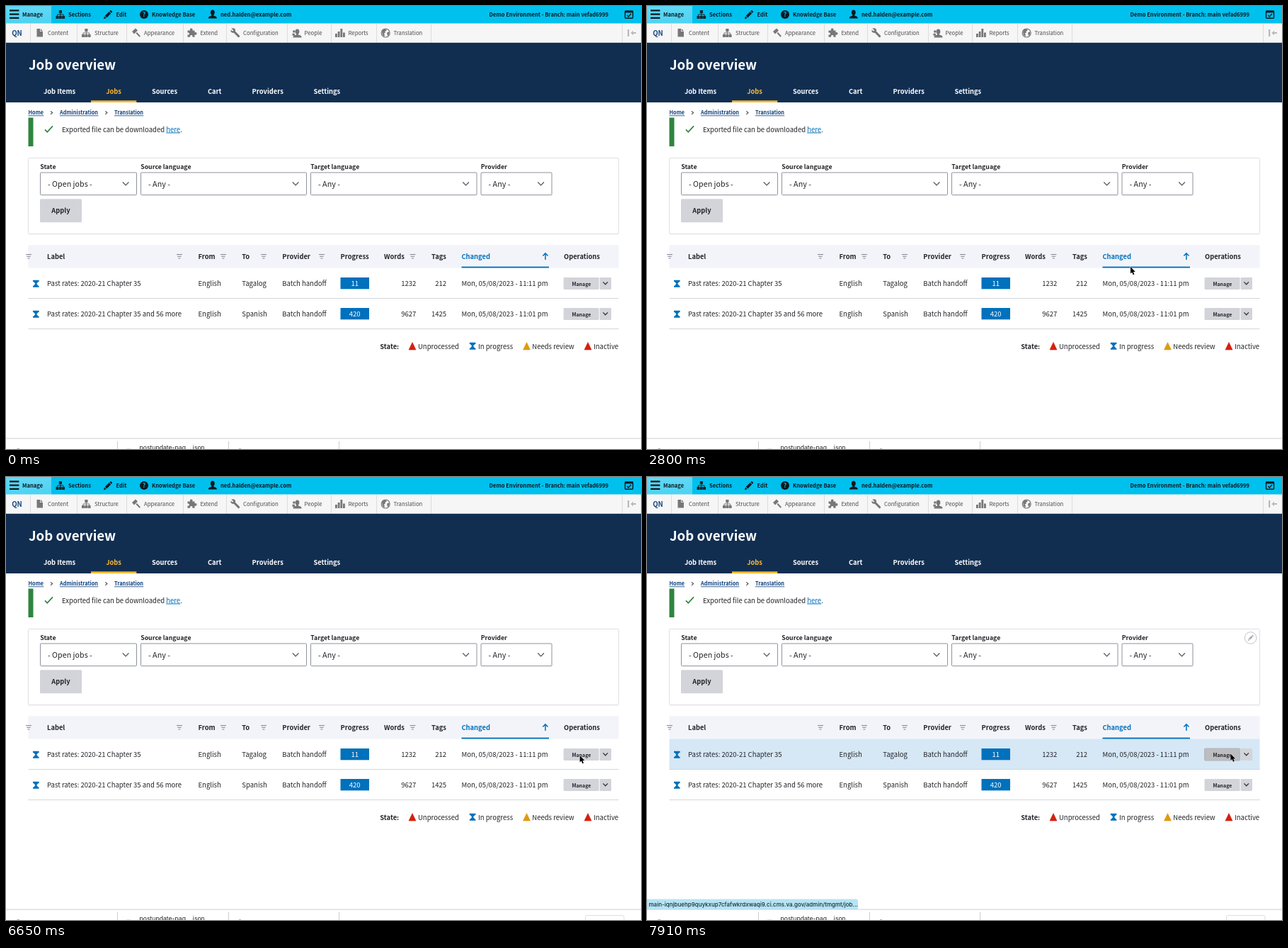
Animation of 897x625 px, one loop 8 s. Source, as an HTML page:

```html
<!DOCTYPE html>
<html lang="en">
<head>
<meta charset="utf-8">
<title>Job overview</title>
<style>
html, body { margin: 0; width: 100%; height: 100%; overflow: hidden; background: #fff; }
svg { display: block; width: 100vw; height: 100vh; }
text { font-family: "Noto Sans CJK JP", "Noto Sans CJK SC", "Noto Sans CJK", "Open Sans", sans-serif; white-space: pre; }
.ui { font-family: Inter, Roboto, sans-serif; }
</style>
</head>
<body>
<svg id="stage" viewBox="0 0 897 625" xmlns="http://www.w3.org/2000/svg"></svg>
<script>
const INK = '#232429', BLUE = '#0071bc', NAVY = '#112e51', GREEN = '#2e8540',
      GREY = '#777', RED = '#d4200f', GOLD = '#e09a12', BUTTON = '#d3d4d9';

// The Latin letters of this family are drawn 1.117 times larger than the design size.
const text = (x, y, str, { size = 10.64, fill = INK, bold = false, anchor = 'start' } = {}) => {
  const px = (size / 1.117 * (bold ? 0.98 : 1)).toFixed(2);
  return `<text x="${x}" y="${y}" font-size="${px}" font-weight="${bold ? 700 : 400}" fill="${fill}" text-anchor="${anchor}">${str}</text>`;
};
const rect = (x, y, w, h, fill, more = '') =>
  `<rect x="${x}" y="${y}" width="${w}" height="${h}" fill="${fill}" ${more}/>`;
const shape = (d, fill, more = '') => `<path d="${d}" fill="${fill}" ${more}/>`;
const stroke = (d, color, width = 1, more = '') =>
  `<path d="${d}" fill="none" stroke="${color}" stroke-width="${width}" ${more}/>`;
const disc = (x, y, r, fill, more = '') => `<circle cx="${x}" cy="${y}" r="${r}" fill="${fill}" ${more}/>`;
const group = (x, y, body, id = '') => `<g ${id && `id="${id}"`} transform="translate(${x} ${y})">${body}</g>`;

const tree = (x, y, color) => group(x, y,
  rect(4.3, 0, 4.2, 4.2, color) + [0, 4.3, 8.6].map(i => rect(i, 8, 4, 4, color)).join('') +
  stroke('M6.4 4V8M2 8V6H10.6V8', color, 1));
const pencil = (x, y, color, scale = 1) => group(x, y, `<g transform="scale(${scale})">` +
  shape('M0 12L1 8.4L3.6 11ZM1.8 7.6L7.6 1.8L10.2 4.4L4.4 10.2ZM8.3 1.1L9.4 0Q10 -.4 10.7 .2L11.8 1.3Q12.3 2 11.8 2.6L10.9 3.7Z', color) + '</g>');
const person = (x, y, color) => group(x, y,
  `<ellipse cx="6" cy="3.6" rx="2.9" ry="3.6" fill="${color}"/>` +
  shape('M4.6 6H7.4V8L11 9.3Q12 9.8 12 12H0Q0 9.8 1 9.3L4.6 8Z', color));
const chevron = (x, y, color = '#545560') => stroke(`M${x - 4.3} ${y - 2.2}l4.3 4.4l4.3-4.4`, color, 1.25);
const triangle = (x, color) => shape(`M${x} 485L${x + 5} 474.6L${x + 10} 485Z`, color, `stroke="${color}" stroke-width=".6" stroke-linejoin="round"`);
const hourglass = (x, y) => shape(`M${x} ${y}h8.6v2.1h-1L5 0z`.replace('L5 0z',
  `l-2.4 2.9l2.4 2.9h1v2.1h-8.6v-2.1h1l2.4-2.9l-2.4-2.9h-1z`), BLUE);
const sortIcon = x => stroke(`M${x} 350.6h8M${x + 1.2} 353.3h5.4M${x + 2.4} 356h3`, '#82848f', 1);

function topBar() {
  const label = (x, str) => text(x, 15, str, { size: 8.645, bold: true, fill: '#101b22' });
  return rect(0, 0, 897, 25, '#00c0ee') + rect(0, 0, 64, 25, 'url(#active)') +
    stroke('M5 6.4H18.4M5 11.6H18.4M5 16.8H18.4', '#10191e', 2.3) +
    tree(70.5, 6, '#1c262b') + pencil(138, 6.2, '#10191e') +
    disc(195, 12, 6, '#10191e') +
    text(195, 15.4, '?', { size: 10, bold: true, fill: '#00c0ee', anchor: 'middle' }) +
    person(285.8, 5.6, '#10191e') +
    label(23, 'Manage') + label(88, 'Sections') + label(155.5, 'Edit') +
    label(206, 'Knowledge Base') + label(303, 'ned.halden@example.com') +
    text(851, 15, 'Demo Environment - Branch: main vefad6999', { size: 8.645, bold: true, fill: '#101b22', anchor: 'end' }) +
    rect(874.5, 7.3, 11, 10, 'none', 'rx="1" stroke="#10191e" stroke-width="1.4"') +
    rect(874, 6.6, 12, 2.8, '#10191e') + stroke('M877.3 13L879.3 15L883 11', '#10191e', 1.4);
}

function tray() {
  const items = [[59, 'Content'], [125, 'Structure'], [195, 'Appearance'], [274.5, 'Extend'],
    [335, 'Configuration'], [421.5, 'People'], [483.5, 'Reports'], [547.5, 'Translation']];
  const dividers = [34.5, 100.5, 170.5, 250.5, 311.5, 397.5, 459.5, 523.5, 600.5, 870.5];
  return rect(0, 24.5, 897, 27.5, '#f6f6f6') +
    text(15.5, 42, 'QN', { size: 11, bold: true, fill: '#14467d', anchor: 'middle' }) +
    dividers.map(x => rect(x - .5, 25, 1, 26.5, '#dcdcdc')).join('') +
    items.map(([x, s]) => text(x, 41.2, s, { size: 8.7, fill: '#4c4c4c' })).join('') +
    shape('M43.5 32H48V36H52V43.5H43.5ZM48.8 32L52 35.2H48.8Z', GREY) +
    tree(107, 32, GREY) +
    shape('M178 36L183 31.5L186 34.5L181 39.5ZM183.5 38.5L185 37L190 42.4L188.5 43.8Z', GREY) +
    shape('M256.5 34.5H260.2Q259 31.5 261.7 31.5T263.2 34.5H266.5V37.3Q269.5 36.3 269.5 38.8T266.5 40.4V43.8H263.3Q264 41 261.8 41T260 43.8H256.5V40.6Q259 41.2 259 39.1T256.5 37.5Z', GREY) +
    stroke('M321.3 35.3L328.6 42.6', GREY, 3, 'stroke-linecap="round"') +
    disc(320.7, 34.6, 3.3, GREY) + shape('M317 31L321.4 34.3L320.2 35.4L316.6 33.2Z', '#f6f6f6') +
    person(405.5, 32.4, GREY) + disc(406.8, 36, 1.8, GREY) + rect(404.5, 38.8, 3.4, 3, GREY) +
    [[465, 5], [468.7, 8], [472.4, 12], [476, 6.5]].map(([x, h]) => rect(x, 44 - h, 2.8, h, GREY)).join('') +
    disc(536.2, 38, 6, '#f6f6f6', `stroke="${GREY}" stroke-width="1.1"`) +
    shape('M531.4 35Q533 32.4 536.6 32.6L538 34L535.4 36L535.8 38L533.4 38.4L535 40.6L534.2 43Q530.3 40 531.4 35ZM538.2 37.4L541.4 36Q542.2 39.5 539.2 42.2L538.4 40Z', GREY) +
    rect(878, 33, 2.2, 10, '#b9b9b9') +
    shape('M882.4 38L886 34.8V37H890V39H886V41.2Z', '#b9b9b9');
}

function pageHeader() {
  const tabs = [[75.5, 'Job Items'], [152, 'Jobs'], [224, 'Sources'], [294.7, 'Cart'], [369.7, 'Providers'], [453.3, 'Settings']];
  const crumbs = [[31.5, 53.3, 'Home'], [76, 130.3, 'Administration'], [153, 194.3, 'Translation']];
  return rect(0, 51.8, 897, 84.2, NAVY) +
    text(32, 89.7, 'Job overview', { size: 21.28, bold: true, fill: '#fff' }) +
    tabs.map(([x, s]) => text(x, 123.8, s, { bold: true, anchor: 'middle', fill: s === 'Jobs' ? '#fdb930' : '#fff' })).join('') +
    rect(120, 133.3, 64.3, 2.7, '#fdb930') +
    crumbs.map(([x, end, s]) => text(x, 153.3, s, { size: 8.38, bold: true, fill: '#0c3f7c' }) +
      rect(x, 154.4, end - x, .8, '#0c3f7c')).join('') +
    [63, 140.3].map(x => stroke(`M${x} 148.3l2.6 2.3l-2.6 2.3`, '#444', 1.1)).join('');
}

function filters() {
  const selects = [[48.5, 136, 'State', '- Open jobs -'], [190.5, 234, 'Source language', '- Any -'],
    [430.5, 234.5, 'Target language', '- Any -'], [671, 100, 'Provider', '- Any -']];
  return rect(31.5, 157.5, 7, 40.5, GREEN) +
    stroke('M55 174.3L58.3 177.8L66 169.4', GREEN, 1.7) +
    text(79, 177.5, `Exported file can be downloaded <tspan fill="${BLUE}" text-decoration="underline">here</tspan>.`) +
    rect(31.5, 215.5, 834, 107, '#f1f1f3', 'rx="1"') +
    rect(31.5, 214.5, 834, 107, '#fff', 'rx="1" stroke="#dedfe4"') +
    selects.map(([x, w, name, value]) =>
      text(x - .3, 230, name, { size: 9.97, bold: true }) +
      rect(x, 235, w, 31.6, '#fff', 'rx="1" stroke="#8e929c"') +
      text(x + 10.5, 255.2, value, { size: 11.97 }) + chevron(x + w - 15.4, 250.7)).join('') +
    rect(48, 272.3, 59, 33, BUTTON, 'rx="1.5"') +
    text(77.5, 292.4, 'Apply', { bold: true, anchor: 'middle' });
}

function row(y, cells, id) {
  const [label, to, progress, words, tags, changed] = cells;
  return hourglass(38, y - 8.2) + text(58, y, label) + text(271.5, y, 'English') + text(333.3, y, to) +
    text(390.3, y, 'Batch handoff') + rect(472.5, y - 12, 40.5, 16.3, BLUE) +
    text(492.7, y - .1, progress, { fill: '#fff', anchor: 'middle' }) +
    text(579.4, y, words, { anchor: 'end' }) + text(622, y, tags, { anchor: 'end' }) +
    text(643.5, y, changed) +
    rect(787.6, y - 12, 50, 17, BUTTON, `rx="1.3" id="${id}"`) +
    rect(838.6, y - 12, 16.4, 17, BUTTON, 'rx="1.3"') +
    text(812.9, y - .3, 'Manage', { size: 8, bold: true, anchor: 'middle' }) +
    stroke(`M843.4 ${y - 5.6}l3.3 3.4l3.3-3.4`, '#333', 1.3) +
    rect(31.5, y + 17, 834, 1, '#d4d5da');
}

function table() {
  const heads = [[58, 'Label'], [271.5, 'From'], [333.3, 'To'], [390.3, 'Provider'], [472.5, 'Progress'],
    [534, 'Words'], [601, 'Tags'], [788, 'Operations']];
  return rect(31.5, 337.3, 834, 32.2, '#f3f4f9') +
    rect(31.5, 369.5, 834, 43, '#d6e7f5', 'id="hoverRow"') +
    heads.map(([x, s]) => text(x, 357, s, { bold: true })).join('') +
    [28, 241, 303, 360, 442, 570.5].map(sortIcon).join('') +
    text(643.5, 357, 'Changed', { bold: true, fill: BLUE }) +
    stroke('M761.9 358V349M758.3 352.5L761.9 348.9L765.5 352.5', BLUE, 1.5) +
    rect(643.5, 367.6, 123.5, 1.9, BLUE) +
    row(395, ['Past rates: 2020-21 Chapter 35', 'Tagalog', '11', '1232', '212', 'Mon, 05/08/2023 - 11:11 pm'], 'firstButton') +
    row(438, ['Past rates: 2020-21 Chapter 35 and 56 more', 'Spanish', '420', '9627', '1425', 'Mon, 05/08/2023 - 11:01 pm'], 'secondButton') +
    text(528.3, 484, 'State:', { bold: true }) +
    triangle(569, RED) + text(582, 484, 'Unprocessed') +
    hourglass(654.8, 474.8) + text(667, 484, 'In progress') +
    triangle(730.5, GOLD) + text(743.3, 484, 'Needs review') +
    triangle(817, RED) + text(830, 484, 'Inactive');
}

function overlays() {
  const arrow = shape('M0 0V9.6L2.1 7.6L3.7 11.3L5.4 10.6L3.9 7H6.8Z', '#000', 'stroke="#fff" stroke-width=".8" paint-order="stroke"');
  const hand = shape('M-1.2 .8Q0 -.6 1 .8V4.6Q2.2 3.8 2.8 5Q4 4.4 4.5 5.6Q6 5.2 6 7V8.8Q5.7 10 4.9 11.8H-.4Q-1 10.2 -3 7.9Q-4 6.3 -2.4 6.2L-1.2 7.2Z', '#fff', 'stroke="#111" stroke-width=".9" stroke-linejoin="round"') +
    stroke('M1 8V10M2.6 8V10M4 8V10', '#333', .5);
  return `<g id="editMark">${disc(852.6, 227, 8.3, '#fff', 'stroke="#c3c4ca"')}${pencil(848.6, 222.9, '#a9aab0', .68)}</g>` +
    rect(0, 609.6, 897, 15.4, '#fff') + rect(0, 609.6, 897, 1, '#cfcfcf') +
    [157.5, 314.5, 470.5].map(x => rect(x - .5, 614, 1, 11, '#cccccc')).join('') +
    '<text class="ui" x="188.6" y="625.6" font-size="8.6" fill="#222">postupdate-pag....json</text>' +
    rect(15.5, 624, 3.5, 1, '#b5b5b5') + rect(170, 624.2, 6, .8, '#dddddd') + rect(329, 624, 3, 1, '#b5b5b5') +
    rect(818.5, 618.5, 54.5, 14, '#fff', 'rx="2.5" stroke="#dedede" id="showAll"') +
    `<g id="status">${shape('M0 595.6H295Q298 595.6 298 598.6V610H0Z', '#b5e4f4')}` +
    '<text class="ui" x="2.5" y="605.8" font-size="8" font-weight="500" fill="#1d2a30">main-iqnjbuehp9quykxup7cfafwkrdxwaqi9.ci.cms.va.gov/admin/tmgmt/job...</text></g>' +
    group(0, 0, arrow, 'arrow') + group(0, 0, hand, 'hand');
}

document.getElementById('stage').innerHTML =
  `<defs><linearGradient id="active" x2="0" y2="1"><stop stop-color="#fff" stop-opacity=".38"/>
   <stop offset="1" stop-color="#fff" stop-opacity=".3"/></linearGradient></defs>` +
  rect(0, 0, 897, 625, '#fff') + topBar() + tray() + pageHeader() + filters() + table() + overlays();

const $ = id => document.getElementById(id);
const part = Object.fromEntries(['hoverRow', 'firstButton', 'editMark', 'showAll', 'status', 'arrow', 'hand'].map(id => [id, $(id)]));

// Screen refresh steps; each move: first step, last step, end point, optional bend point.
const LOOP = 8000, STEP = 70;
const moves = [
  [13, 15, 393, 524], [20, 20, 525, 426], [21, 22, 791, 391], [27, 33, 580, 357, 700, 308],
  [36, 40, 683, 368], [43, 47, 816, 372], [49, 57, 809.6, 393],
  [95, 95, 810.6, 393], [96, 105, 824, 391], [113, 113, 824.4, 390.4],
];
const clamp = v => Math.max(0, Math.min(1, v));

function pointer(step) {
  let x = 416, y = 584;
  for (const [from, to, ex, ey, bx = (x + ex) / 2, by = (y + ey) / 2] of moves) {
    if (step < from) break;
    const k = clamp((step - from + 1) / (to - from + 1)), e = k * k * (3 - 2 * k);
    const bend = (a, b, c) => (1 - e) * (1 - e) * a + 2 * e * (1 - e) * b + e * e * c;
    [x, y] = [bend(x, bx, ex), bend(y, by, ey)];
  }
  return [x, y];
}

const show = (el, on) => el.setAttribute('opacity', Number(on));

function draw(time) {
  const step = Math.floor(time / STEP);
  const hover = step >= 97, pointing = hover && step < 113;
  const place = `translate(${pointer(step).map(v => v.toFixed(1)).join(' ')})`;
  part.arrow.setAttribute('transform', place);
  part.hand.setAttribute('transform', place);
  show(part.arrow, step >= 13 && !pointing);
  show(part.hand, pointing);
  show(part.hoverRow, hover);
  show(part.editMark, hover);
  part.firstButton.setAttribute('fill', hover ? '#bdbdc0' : BUTTON);
  part.firstButton.setAttribute('stroke', hover ? '#aeb4ba' : 'none');
  show(part.showAll, clamp((step - 69) / 4));
  show(part.status, clamp((step - 106) / 4));
}

function tick(now) {
  draw(now % LOOP);
  requestAnimationFrame(tick);
}
draw(0);
requestAnimationFrame(tick);
</script>
</body>
</html>
```
